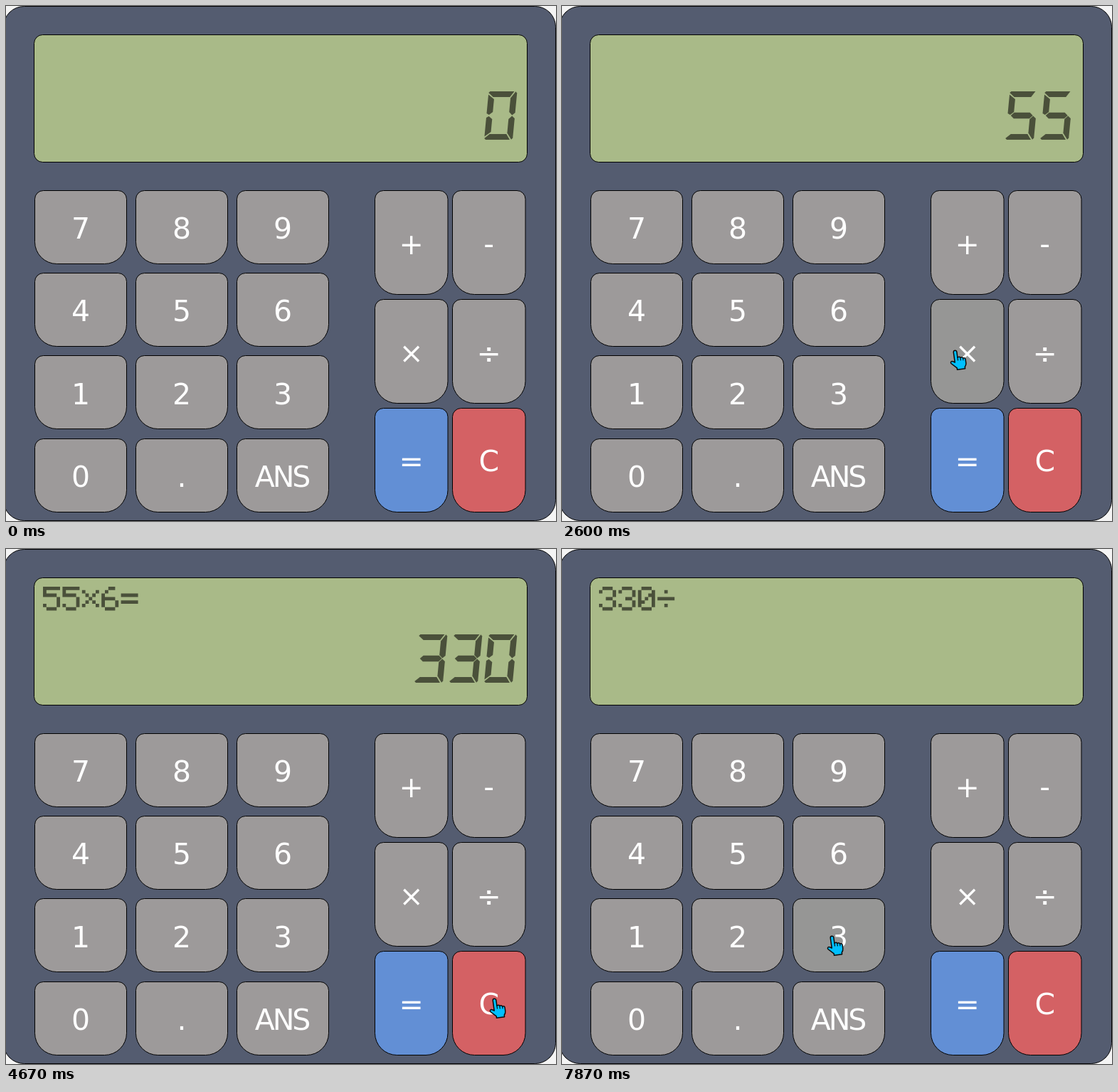
Write an HTML page that moves like this. It is 773x724 px and loops after 8000 ms.

```html
<!DOCTYPE html>
<html lang="en">
<head>
<meta charset="utf-8">
<title>Calculator</title>
<style>
  html, body { margin: 0; width: 100%; height: 100%; overflow: hidden; background: #f4f4f4; }
  svg { display: block; width: 773px; height: 724px; }
  .case { fill: #545c70; stroke: #000; }
  .screen { fill: #a9ba88; stroke: #000; }
  .key path { fill: #9d9a9a; stroke: #000; }
  .key.hover path { fill: #969695; }
  .key.equals path { fill: #628fd5; }
  .key.clear path { fill: #d46164; }
  .key text { font: 41px "DejaVu Sans", Verdana, sans-serif; fill: #fff; text-anchor: middle; }
  .key .word { letter-spacing: -3px; transform: translateX(-1.5px); }
  .ink { fill: #4a503a; }
  #hand path { fill: #00bfff; stroke: #0a0a0a; stroke-width: 1.5; stroke-linejoin: round; stroke-linecap: round; }
  #hand .crease { fill: none; stroke-width: 1.2; }
</style>
</head>
<body>
<svg viewBox="0 0 773 724">
  <rect class="case" x="-3.5" y=".5" width="776" height="723" rx="29"/>
  <rect class="screen" x="39.5" y="40.5" width="693" height="179" rx="12"/>
  <g id="line" class="ink"></g>
  <g id="value" class="ink"></g>
  <g id="keys"></g>
  <g id="hand">
    <g transform="rotate(-8 11.5 14.5)">
      <path d="M6.8 3.1a2.3 2.3 0 0 1 4.6 0V11q3-1.2 3.8.8q3-.8 3.6 1.2q3.3-.4 3.3 2V20q0 3.4-2.3 5.6V28H8.6v-2.4L1.5 18.4Q.2 16.6 2 15.4Q3.8 14.6 6.8 17.4Z"/>
      <path class="crease" d="M11.4 11v4M15.2 12v3.4M18.8 13.2v2.6"/>
    </g>
  </g>
</svg>
<script>
const $ = id => document.getElementById(id);
const LOOP = 8000, FPS = 15;

// Keys: small top corners, large bottom corners
const keyShape = (x, y, w, h, top = 12, low = 31) =>
  `M${x} ${y + top}a${top} ${top} 0 0 1 ${top} ${-top}H${x + w - top}a${top} ${top} 0 0 1 ${top} ${top}` +
  `V${y + h - low}a${low} ${low} 0 0 1 ${-low} ${low}H${x + low}a${low} ${low} 0 0 1 ${-low} ${-low}Z`;

const keys = [];
function addKeys(labels, cols, left, stepX, stepY, w, h) {
  labels.forEach((label, i) => {
    const x = left + i % cols * stepX, top = 259.5 + Math.floor(i / cols) * stepY;
    const y = Math.floor(top) + .5, baseline = Math.floor(top + h / 2 + 16.7);
    const kind = { '=': 'equals', C: 'clear' }[label] || '';
    $('keys').insertAdjacentHTML('beforeend',
      `<g class="key ${kind}"><path d="${keyShape(x, y, w, h)}"/>` +
      `<text class="${label.length > 1 ? 'word' : ''}" x="${x + w / 2}" y="${baseline}">${label}</text></g>`);
    keys.push({ x, y, w, h, el: $('keys').lastElementChild });
  });
}
addKeys(['7', '8', '9', '4', '5', '6', '1', '2', '3', '0', '.', 'ANS'], 3, 40.5, 142, 116.2, 129, 103);
addKeys(['+', '-', '×', '÷', '=', 'C'], 2, 518.5, 109, 152.85, 102.5, 146);

// Slanted seven-segment digits; the lower half mirrors the upper
const upper = {
  a: '0,2 2,0 36,0 30.5,8 7,8',
  b: '38,.3 40,2.5 40,30 36,33.5 31.5,29 31.5,9.5',
  f: '0,4.5 8.5,11 8.5,29 3.5,33 0,31'
};
const mirror = { d: 'a', c: 'b', e: 'f' };
const middle = '4.5,34 9,29.7 31,29.7 35.5,34 31,38.3 9,38.3';
const lit = { 0: 'abcdef', 3: 'abcdg', 5: 'acdfg', 6: 'acdefg' };

const segment = s => mirror[s]
  ? `<polygon points="${upper[mirror[s]]}" transform="matrix(1 0 0 -1 0 68)"/>`
  : `<polygon points="${upper[s] || middle}"/>`;
const bigText = text => [...text].map((c, i) => {
  const x = 672 - (text.length - 1 - i) * 49;
  return `<g transform="matrix(1 0 -.095 1 ${x + 6.46} 120)">${[...lit[c]].map(segment).join('')}</g>`;
}).join('');

// Dot-matrix characters: pen strokes through column-row points of a 5 x 7 grid
const strokes = {
  0: '10-30-41-45-36-16-05-01-10 14-32',
  3: '01-10-30-41-42-33-23 44-45-36-16-05',
  5: '40-00-02-32-43-45-36-16-05',
  6: '30-20-02-05-16-36-45-44-33-03',
  '×': '01-45 41-05',
  '÷': '21 03-43 25',
  '=': '02-42 04-44'
};
const CELL = 4.8;
function smallText(text) {
  let d = '';
  [...text].forEach((c, i) => {
    const dot = (col, row) => {
      d += `M${52 + i * 27.4 + col * CELL} ${53 + row * CELL}h${CELL}v${CELL}h${-CELL}z`;
    };
    for (const stroke of strokes[c].split(' ')) {
      let [x, y] = stroke;
      for (const [toX, toY] of stroke.split('-')) {
        const n = Math.max(Math.abs(toX - x), Math.abs(toY - y));
        for (let k = 1; k <= n; k++) dot(+x + (toX - x) * k / n, +y + (toY - y) * k / n);
        [x, y] = [toX, toY];
      }
      dot(+stroke[0], +stroke[1]);
    }
  });
  return `<path d="${d}"/>`;
}

// Presses and moves are timed in ticks of 1/15 s
const presses = [
  [26, '5'], [32, '5'], [43, '×'], [55, '6'], [64, '='], [80, 'C'], [91, 'ANS'], [110, '÷']
];
function calculate(tick) {
  let value = '0', line = '', ans = '0';
  for (const [at, key] of presses) {
    if (at > tick) break;
    if (key === 'C') {
      value = '0';
      line = '';
    } else if (key === 'ANS') {
      value = ans;
    } else if (key === '=') {
      const [a, b] = (line + value).split('×');
      line += value + key;
      value = ans = String(a * b);
    } else if (key >= '0' && key <= '9') {
      value = value === '0' ? key : value + key;
    } else {
      line = value + key;
      value = '';
    }
  }
  return { value, line };
}

// [start, end, x, y]
const START = { tick: 12, x: 203, y: 663 };
const moves = [
  [12, 22, 226, 432], [33, 40, 562, 486], [44, 52, 368, 430], [55, 58, 548, 655],
  [66, 70, 679, 631], [80, 84, 424, 661], [86, 88, 420, 661], [95, 102, 679, 448],
  [104, 106, 670, 462], [110, 112, 319, 389], [114, 118, 372, 543]
];
const ease = u => (1 - Math.cos(Math.PI * Math.min(1, Math.max(0, u)))) / 2;
function handAt(tick) {
  let { x, y } = START;
  for (const [from, to, toX, toY] of moves) {
    const e = ease((tick - from) / (to - from));
    x += (toX - x) * e;
    y += (toY - y) * e;
  }
  return tick < START.tick ? [-99, -99] : [Math.round(x), Math.round(y)];
}

let shown = -1;
function draw(now) {
  // The small lead absorbs times rounded to 10 ms
  const tick = Math.floor((now % LOOP) * FPS / 1000 + .06) % (LOOP * FPS / 1000);
  if (tick === shown) return;
  shown = tick;

  const { value, line } = calculate(tick);
  $('value').innerHTML = bigText(value);
  $('line').innerHTML = smallText(line);

  const [x, y] = handAt(tick);
  $('hand').setAttribute('transform', `translate(${x} ${y})`);
  for (const k of keys) {
    const dx = x + 8 - k.x, dy = y + 1 - k.y;
    k.el.classList.toggle('hover', dx > 0 && dx < k.w && dy > 0 && dy < k.h);
  }
}
function loop() {
  draw(performance.now());
  requestAnimationFrame(loop);
}
draw(0);
requestAnimationFrame(loop);
</script>
</body>
</html>
```
